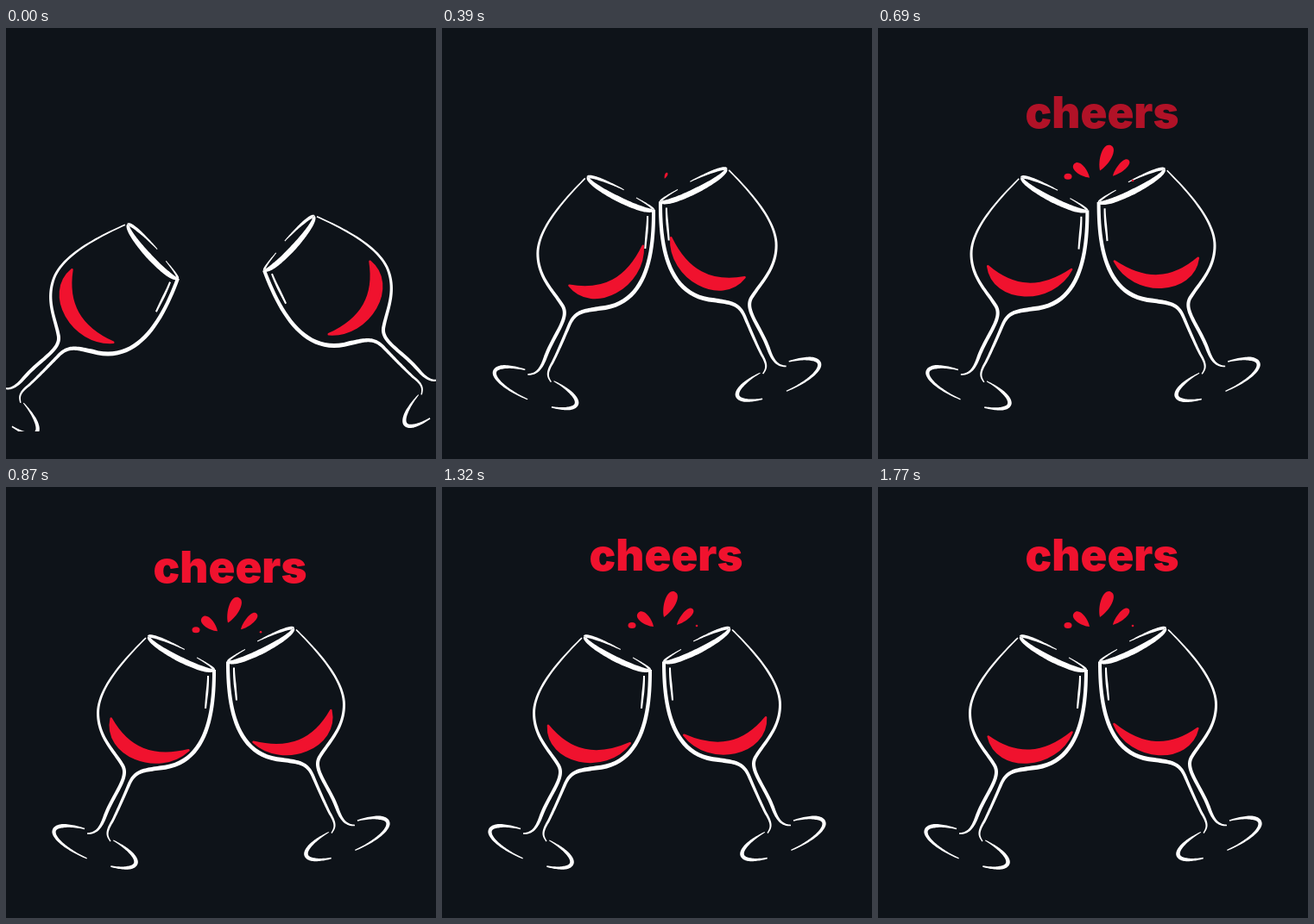
Write an HTML page with a canvas that moves like this. It is 498x500 px and loops after 1.8 s.

```html
<!DOCTYPE html>
<html lang="en">
<head>
<meta charset="utf-8">
<title>cheers</title>
<style>
html, body { margin: 0; width: 100%; height: 100%; overflow: hidden; background: #0e1319; }
canvas { display: block; }
</style>
</head>
<body>
<canvas id="stage" width="498" height="500"></canvas>
<script>
const ctx = document.getElementById('stage').getContext('2d');
const LOOP = 1800, STEP = 30, HIT = 375;
const BG = '#0e1319', RED = '#f0122e', WHITE = '#fff';
const PIVOT = [180.3, 237.3];
const RAD = Math.PI / 180;

const clamp = v => Math.min(1, Math.max(0, v));
const mix = (a, b, u) => a + (b - a) * u;
const smooth = v => { v = clamp(v); return v * v * (3 - 2 * v); };
const ease = (t, from, to) => smooth((t - from) / (to - from));

// Outline of a brush stroke along curve(u), its width running through the given values.
function brush(curve, widths, steps = 60) {
  const path = new Path2D(), left = [], right = [], n = widths.length - 1;
  for (let i = 0; i <= steps; i++) {
    const u = i / steps, j = Math.min(n - 1, Math.floor(u * n));
    const half = mix(widths[j], widths[j + 1], u * n - j) / 2;
    const [x, y] = curve(u), a = curve(Math.max(0, u - 0.004)), b = curve(Math.min(1, u + 0.004));
    const dx = b[0] - a[0], dy = b[1] - a[1], k = half / Math.hypot(dx, dy);
    left.push([x - dy * k, y + dx * k]);
    right.unshift([x + dy * k, y - dx * k]);
  }
  left.concat(right).forEach(p => path.lineTo(...p));
  path.closePath();
  return path;
}

// Chain of cubics; every third point lies on the curve.
function cubics(...p) {
  const n = (p.length - 1) / 3;
  return u => {
    const i = Math.min(n - 1, Math.floor(u * n)), s = u * n - i, r = 1 - s;
    return [0, 1].map(c => r * r * r * p[3 * i][c] + 3 * r * r * s * p[3 * i + 1][c]
      + 3 * r * s * s * p[3 * i + 2][c] + s * s * s * p[3 * i + 3][c]);
  };
}

function arc(x, y, rx, ry, tilt, from, to) {
  const c = Math.cos(tilt * RAD), s = Math.sin(tilt * RAD);
  return u => {
    const a = mix(from, to, u) * RAD, px = rx * Math.cos(a), py = ry * Math.sin(a);
    return [x + px * c - py * s, y + px * s + py * c];
  };
}

const rim = (depth, from, to) => arc(203, 192.8, 42, depth, 26.9, from, to);
const foot = (from, to) => arc(103, 417.5, 51, 16, 22.5, from, to);

const glass = [
  // bowl and stem, both sides
  brush(cubics([162, 175], [140, 197], [106.5, 232], [106.5, 262], [106.5, 290], [125, 306], [135, 323],
    [143, 337], [125, 355], [115, 381], [110, 395], [105, 402], [94, 402]), [1.6, 3, 4, 4, 1.6], 100),
  brush(cubics([241, 212], [241, 262], [233, 322], [178, 326], [158, 329], [149, 329], [142, 346],
    [136, 360], [129, 376], [123, 388], [115, 401], [117, 405], [121, 411]), [4, 5, 3.6, 2.8, 1.4], 100),
  brush(rim(7, 180, 0), [3, 5, 6.5, 6, 3]),
  brush(rim(5.5, 180, 272), [4, 3.4, 1]),
  brush(rim(4, 296, 360), [1, 2, 3]),
  brush(foot(248, 94), [1.4, 4.4, 4.2, 2.8, 1.2]),
  brush(foot(-71, 60), [1, 3.6, 4.6, 4, 1.6]),
  // shine
  brush(cubics([234, 219], [234, 232], [232, 244], [231, 257]), [2, 2.8, 2])
];

// Swing in up to the clink, then settle back slowly.
function pose(t) {
  const u = t / HIT;
  if (u < 1) return {
    x: mix(-47, 4.2, u ** 2.75),
    y: mix(55.7, -0.7, u ** 3.35),
    turn: mix(20.5, -0.4, u ** 5)
  };
  const k = 1 - ease(t, HIT, 895);
  return { x: 4.2 * k, y: -0.7 * k, turn: -0.4 * k };
}

// Slosh angle of the wine inside the glass, in degrees.
function slosh(t) {
  if (t < 390) return mix(40, -28, (t / 390) ** 3.85);
  if (t < 930) return mix(-28, 24, ease(t, 390, 930));
  return mix(24, -3, ease(t, 930, 1780));
}

// One crescent that rocks along the bottom of the bowl.
function drawWine(t) {
  const tilt = slosh(t);
  ctx.save();
  ctx.translate(175 - 0.38 * tilt, mix(276.5, 287, ease(t, 620, 880)));
  ctx.rotate(tilt * RAD);
  ctx.beginPath();
  ctx.moveTo(-48.5, 0);
  ctx.bezierCurveTo(-41, 43, 28, 43, 48.5, 0);
  ctx.bezierCurveTo(14, 25, -17, 25, -48.5, 0);
  ctx.closePath();
  ctx.fillStyle = ctx.strokeStyle = RED;
  ctx.lineWidth = 2.5;
  ctx.lineJoin = 'round';
  ctx.fill();
  ctx.stroke();
  ctx.restore();
}

function drawGlass(t, mirrored) {
  const p = pose(t);
  ctx.save();
  ctx.beginPath();
  ctx.rect(0, 0, 498, 468);
  ctx.clip();
  if (mirrored) ctx.transform(-1, 0, 0, 1, 498, -9.5);
  ctx.translate(PIVOT[0] + p.x, PIVOT[1] + p.y);
  ctx.rotate(p.turn * RAD);
  ctx.translate(-PIVOT[0], -PIVOT[1]);
  drawWine(t);
  ctx.fillStyle = WHITE;
  glass.forEach(path => ctx.fill(path));
  ctx.restore();
}

// A drop flies out of the clink, then drifts up to its place.
function drawDrop(t, { x, y, len, wide, angle, lift = 0.8, delay = 30, round = false }) {
  const u = clamp((t - 360 - delay) / 240), s = 1 - (1 - u) * (1 - u);
  if (!s) return;
  const rise = 19.5 * lift * (1 - ease(t, 480, 1120));
  ctx.save();
  ctx.translate(mix(258, x, s), mix(176, y + rise, s));
  ctx.rotate(angle * RAD);
  ctx.scale(s, s);
  ctx.beginPath();
  if (round) ctx.ellipse(0, 0, len / 2, wide / 2, 0, 0, 7);
  else {
    ctx.moveTo(0, 0);
    ctx.bezierCurveTo(len * 0.35, -wide * 0.6, len, -wide * 0.75, len, 0);
    ctx.bezierCurveTo(len, wide * 0.75, len * 0.35, wide * 0.6, 0, 0);
  }
  ctx.fill();
  ctx.restore();
}

function drawSplash(t) {
  ctx.fillStyle = RED;
  drawDrop(t, { x: 257, y: 151, len: 32, wide: 13, angle: -67, lift: 1, delay: 0 });
  drawDrop(t, { x: 272, y: 160, len: 26, wide: 9, angle: -45 });
  drawDrop(t, { x: 245, y: 162, len: 24, wide: 11, angle: -138 });
  drawDrop(t, { x: 220, y: 160.5, len: 9, wide: 7, angle: 0, round: true });
  drawDrop(t, { x: 295, y: 161, len: 2.6, wide: 2.6, angle: 0, lift: 1.1, round: true });
}

function drawWord(t) {
  ctx.save();
  ctx.globalAlpha = clamp((t - 540) / 207);
  ctx.fillStyle = RED;
  ctx.font = '900 51px Inter, sans-serif';
  ctx.textAlign = 'center';
  ctx.fillText('cheers', 259.5, 97 + 20 * (1 - ease(t, 600, 1360)));
  ctx.restore();
}

function draw(t) {
  ctx.fillStyle = BG;
  ctx.fillRect(0, 0, 498, 500);
  drawGlass(t, false);
  drawGlass(t, true);
  drawSplash(t);
  drawWord(t);
}

const begin = performance.now();
function tick() {
  const t = (performance.now() - begin) % LOOP;
  draw(Math.floor(t / STEP) * STEP);
  requestAnimationFrame(tick);
}
tick();
</script>
</body>
</html>
```
